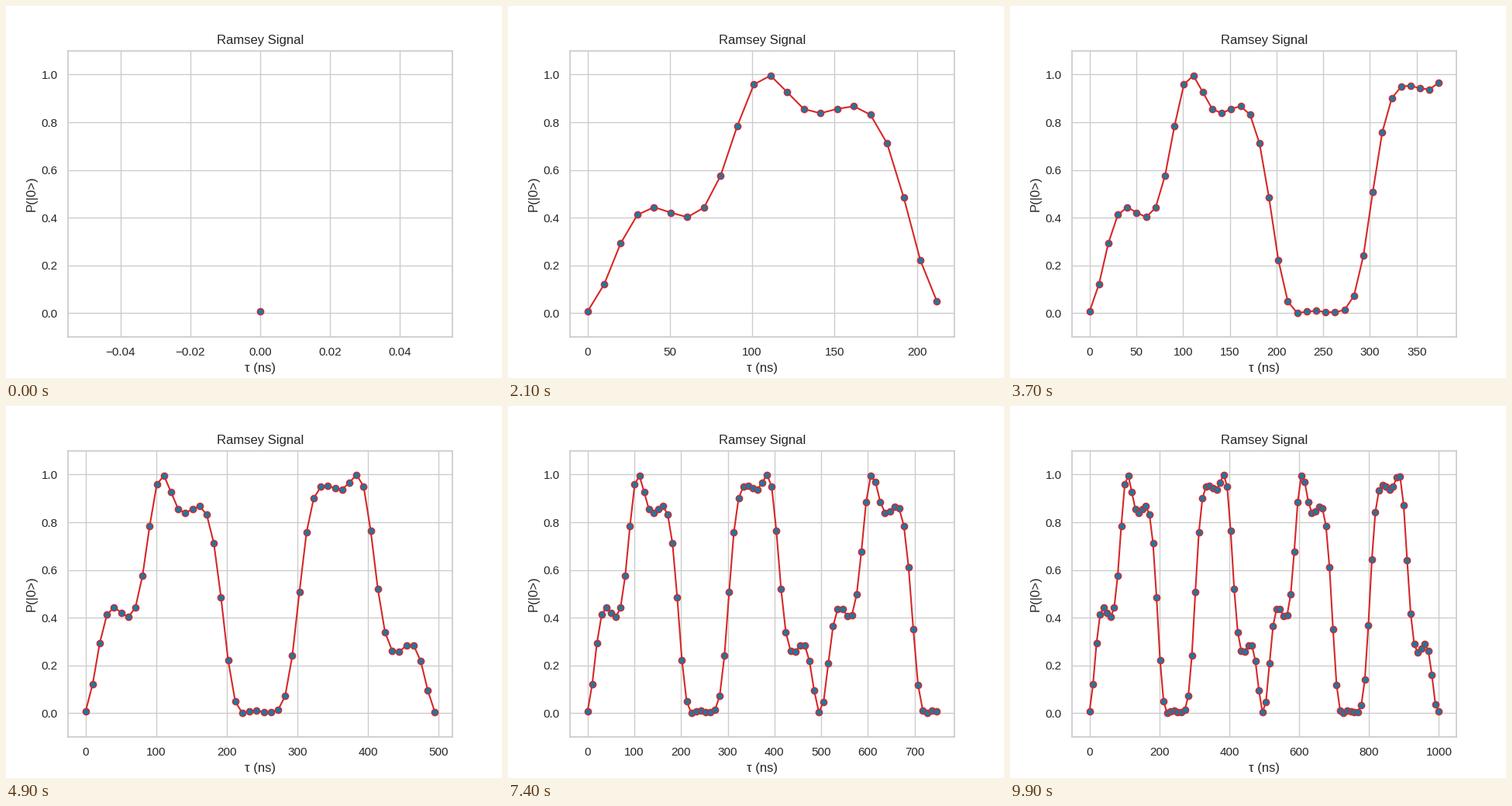
These frames come from a looping animation (640x480 px, 10 s). A matplotlib script:

```python
import numpy as np
import matplotlib.pyplot as plt
from matplotlib.animation import FuncAnimation

FRAMES = 100
INK, RULE = ".15", ".8"

plt.rcParams.update({
    "font.family": "Liberation Sans",
    "text.color": INK,
    "axes.labelcolor": INK,
    "axes.titlesize": 12,
    "axes.labelsize": 12,
    "axes.edgecolor": RULE,
    "axes.linewidth": 1.25,
    "axes.axisbelow": True,
    "axes.grid": True,
    "grid.color": RULE,
    "grid.linewidth": 1,
    "lines.solid_capstyle": "round",
})
for axis in ("xtick", "ytick"):
    plt.rcParams.update({
        f"{axis}.color": INK,
        f"{axis}.labelsize": 11,
        f"{axis}.major.size": 6,
    })

# Detuned precession with a 100 ns phase modulation
tau = np.linspace(0, 1000, FRAMES)
phase = 0.08 + 0.004 * np.pi * tau + 0.25 * np.sin(2 * np.pi * tau / 100)
prob = np.sin(phase) ** 2

fig, ax = plt.subplots(figsize=(6.4, 4.8), dpi=100)
ax.tick_params(bottom=False, left=False)
ax.set_title("Ramsey Signal")
ax.set_xlabel("τ (ns)")
ax.set_ylabel("P(|0>)")
ax.set_ylim(-0.1, 1.1)
line, = ax.plot([], [], "o-", color="tab:red", markerfacecolor="#2077a2")


def update(i):
    line.set_data(tau[:i + 1], prob[:i + 1])
    ax.relim()
    ax.autoscale_view(scaley=False)
    return line,


anim = FuncAnimation(fig, update, frames=FRAMES, interval=100,
                     repeat=True, repeat_delay=0, blit=False)
plt.show()
```
